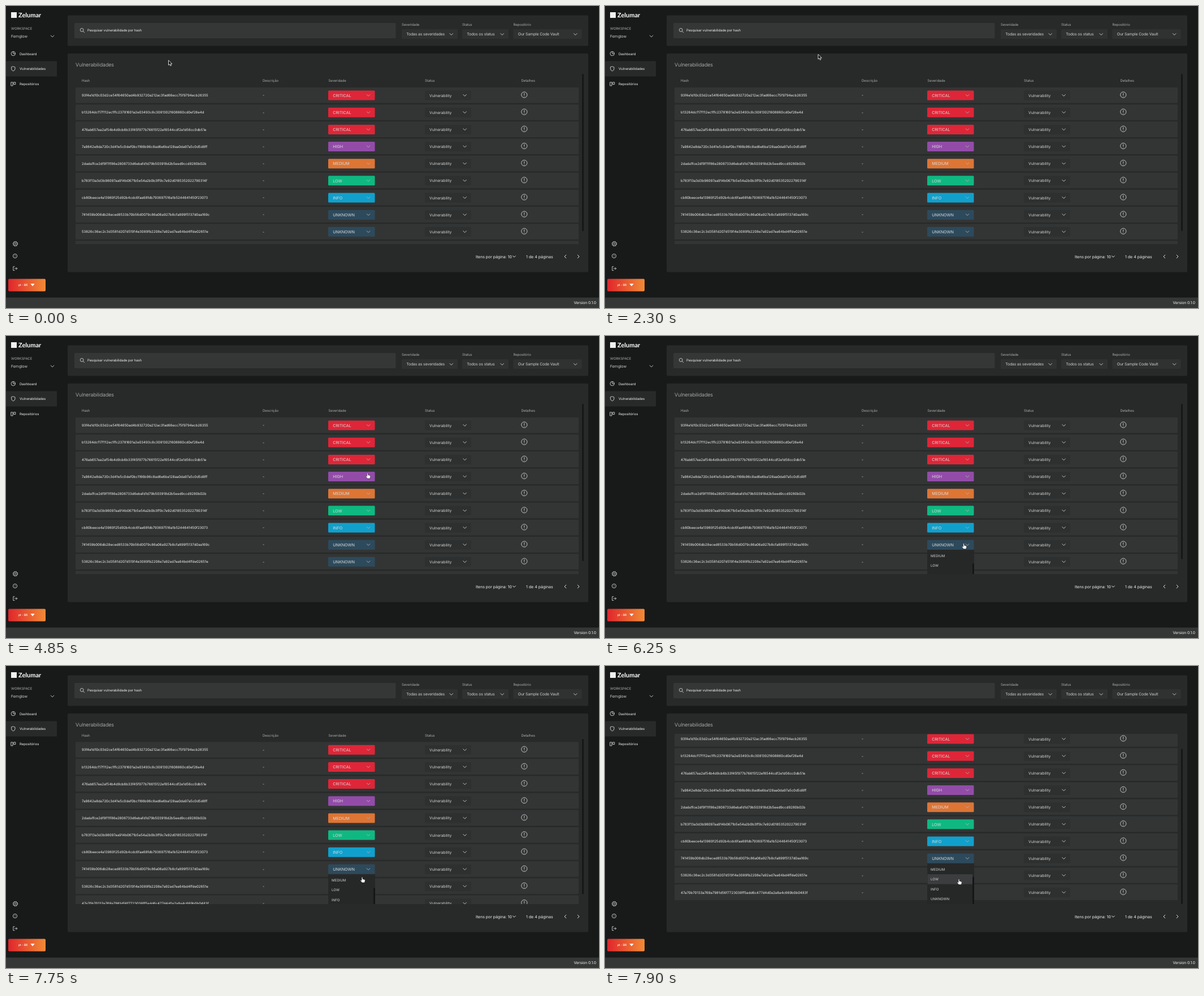
These frames come from a looping animation (1049 by 534 pixels, 8 s). An HTML page:

```html
<!DOCTYPE html>
<html lang="pt-BR">
<head>
<meta charset="utf-8">
<title>Vulnerabilidades</title>
<style>
  html, body { margin: 0; width: 100%; height: 100%; overflow: hidden; background: #181a1a; }
  svg { display: block; width: 100%; height: 100%; }
  text { font-family: Inter, "Noto Sans", sans-serif; text-rendering: geometricPrecision; white-space: pre; }
  .line { fill: none; stroke-linecap: round; stroke-linejoin: round; }
</style>
</head>
<body>
<svg id="stage" viewBox="0 0 1049 534"></svg>
<script>
const LOOP = 8000, TICK = 50;
const WHITE = '#f1f1f1', SOFT = '#d2d2d2', MUTED = '#adadad';
const BG = '#181a1a', PANEL = '#282a2a', ROW = '#333535';
const FIRST_ROW = 158, PITCH = 30.15, OPTION = 17.5;
const VIEW = { top: 120, height: 301 };
const LIST = { x: 570, y: 378, w: 83, h: 72 };

const COLORS = {
  CRITICAL: '#de2638', HIGH: '#924ca8', MEDIUM: '#dd7535',
  LOW: '#10b881', INFO: '#11a0cc', UNKNOWN: '#2d4a5c'
};
const ROWS = [
  ['93f4e1d10c03d2ce54f64650ad4b932720a212ac3fad66ecc75f9794ecb26355', 'CRITICAL'],
  ['b13264dcf17f112ec1ffc23781601a2e03493c8c30813021608860cd0ef26e4d', 'CRITICAL'],
  ['476ab657ea2af54b4d9cb6b33f45f977b76615f22ef6544cdf2e1d56cc0db51e', 'CRITICAL'],
  ['7a9842e8da720c3d41e5c0def0bc1166b96c8ad6e6ba128aa0da97a5c0d5d8ff', 'HIGH'],
  ['2dada1fce2df9f11f86e2808733d6ebafd1d79b503918d2b5eed9ccd9280b02b', 'MEDIUM'],
  ['b783f13a3d3b98097aa914b0671b5e54a2b0b3ff9c7e92d0185352022790314f', 'LOW'],
  ['cb80beece4a13969125d92b4cdc6faa68fdb793697516a1b5244641450f23073', 'INFO'],
  ['741459b006db28eced8533b70b56d0079c86a06a927b8cfa899f5137d0aa169c', 'UNKNOWN'],
  ['53826c36ec2c3d3581d207d51914e3089fb2208e7a92ad7ea64bd4ffde02651e', 'UNKNOWN'],
  ['47a70b70133a769a7981d56f7723038ff5add6c477d4d0a2a8a4c669b0b0483f', 'UNKNOWN']
];

// Pointer moves: first step, last step, destination x, y
const START = [287.5, 96];
const MOVES = [
  [500, 500, 291, 92], [600, 600, 288, 91.5], [900, 1400, 317.5, 97],
  [1600, 1700, 346.5, 88.5], [1900, 1900, 350, 88.5], [2100, 2300, 377, 85.5],
  [2450, 2500, 454, 99], [2650, 2700, 560, 120], [2850, 2900, 719, 133],
  [3050, 3100, 709, 184], [3350, 3450, 686, 227], [3600, 3600, 661, 245],
  [3750, 3800, 646, 247], [3950, 3950, 644, 247], [4100, 4150, 640, 247],
  [4850, 4850, 639.5, 242], [5050, 5250, 639, 291], [5400, 5650, 635, 365],
  [5800, 5800, 634.5, 366.5], [6700, 6900, 634, 372], [7100, 7100, 633.5, 372],
  [7300, 7300, 630, 373], [7850, 7900, 626, 376.5]
];

const rowY = i => FIRST_ROW + i * PITCH;

// Drawing helpers; text is placed by the vertical centre of its capitals
const rect = (x, y, w, h, fill, r = 1.5, extra = '') =>
  `<rect x="${x}" y="${y}" width="${w}" height="${h}" rx="${r}" fill="${fill}" ${extra}/>`;
const text = (str, x, midY, size = 6, fill = WHITE, spacing = -.07, extra = '') =>
  `<text x="${x}" y="${midY + size * .364}" font-size="${size}" fill="${fill}" letter-spacing="${spacing}" ${extra}>${str}</text>`;
const line = (d, color = SOFT, width = .9) =>
  `<path class="line" d="${d}" stroke="${color}" stroke-width="${width}"/>`;
const ring = (x, y, r, color = SOFT, width = .9, extra = '') =>
  `<circle cx="${x}" cy="${y}" r="${r}" fill="none" stroke="${color}" stroke-width="${width}" ${extra}/>`;
const chevron = (x, y, color = SOFT, w = 2.8) =>
  line(`M${x - w} ${y - w / 2}l${w} ${w}l${w} ${-w}`, color);

function sidebar() {
  return rect(9, 11, 10, 10, WHITE, 0) +
    text('Zelumar', 22, 16, 11, '#fff', 0, 'style="font-family:Lato,sans-serif" font-weight="700"') +
    text('WORKSPACE', 9, 39.5, 6, MUTED, -.03) +
    text('Fernglow', 9, 54, 6.8, SOFT, -.1) + chevron(82, 53.5) +
    rect(0, 97.5, 90, 27, PANEL, 0) +
    ring(12.8, 84.2, 3.7) + line('M12.8 80.5V84.2H16.5') + text('Dashboard', 24, 84.5) +
    line('M12.8 107L16 108.2V111Q16 113.8 12.8 115Q9.6 113.8 9.6 111V108.2Z') + text('Vulnerabilidades', 24, 111.2) +
    line('M9.2 134.8H12V141H9.2ZM14 134.8H16.8V138.6H14Z') + text('Repositórios', 24, 137.8) +
    ring(16.5, 420.5, 3.5) + ring(16.5, 420.5, 4.3, SOFT, .8, 'stroke-dasharray="1.7 1.68"') + ring(16.5, 420.5, 1.3, SOFT, .8) +
    ring(16, 442, 3.6) + text('?', 16, 442, 4.8, SOFT, 0, 'text-anchor="middle"') +
    line('M15 460.8H12.8V467.6H15M15.5 464.2H19.6M18 462.4L19.8 464.2L18 466') +
    rect(4, 482.5, 66, 22, 'url(#warm)', 2) +
    text('pt - BR', 22, 493.5, 5, '#fff', 0, 'font-weight="500"') +
    '<path d="M43.3 491h7.4l-3.7 4.6z" fill="#fff"/>';
}

function filters() {
  const select = (label, value, x, w) =>
    text(label, x, 32.5, 6, MUTED) + rect(x, 41, w, 17, '#303232') +
    text(value, x + 8.3, 50, 6.8, SOFT, -.1) + chevron(x + w - 11.3, 50);
  return rect(109, 16.5, 921, 54, PANEL, 2) + rect(121, 30, 568.5, 27, '#353737') +
    ring(134.2, 42.4, 2.9) + line('M136.4 44.6L138.7 46.9') +
    text('Pesquisar vulnerabilidade por hash', 144, 43.2, 6, WHITE, -.1) +
    select('Severidade', 'Todas as severidades', 700, 99) +
    select('Status', 'Todos os status', 807, 82) +
    select('Repositório', 'Our Sample Code Vault', 897.5, 121);
}

function tableRow([hash, severity], i) {
  const y = rowY(i);
  return rect(123, y - 14, 890, 27.6, ROW) +
    text(hash, 134, y, 6.05, WHITE, 0) + text('-', 454, y, 6.5) +
    rect(570, y - 8.4, 82.5, 17, COLORS[severity]) +
    text(severity, 578.2, y + .2, 7.15, '#d9d9d9', 0) + chevron(641, y, '#b0b0b0') +
    rect(741, y - 8.4, 82, 17, '#2e3030') +
    text('Vulnerability', 749, y + .2, 6.8, SOFT, -.06) + chevron(811.6, y) +
    ring(916.8, y - 1, 5.1) + line(`M916.8 ${y - 3.8}v3.4m0 2v.1`);
}

function dropdown() {
  const options = ['MEDIUM', 'LOW', 'INFO', 'UNKNOWN'];
  const top = LIST.y + 1.7;
  return rect(LIST.x, LIST.y, LIST.w, LIST.h, '#262828', 0) +
    rect(LIST.x + .5, top + OPTION, 79.5, OPTION, '#3b3d3f', 0, 'id="hover"') +
    options.map((o, i) => text(o, 576, top + OPTION * (i + .5), 6.1, SOFT, 0)).join('') +
    rect(650, LIST.y + 24, 3, 48, '#151717', 1.2);
}

function table() {
  const heads = [['Hash', 134], ['Descrição', 454], ['Severidade', 570.3], ['Status', 741], ['Detalhes', 911.5]];
  return rect(109, 84, 921, 386.5, PANEL, 2) +
    text('Vulnerabilidades', 123, 103.8, 9, '#c4c4c4', -.1, 'font-weight="300"') +
    `<g clip-path="url(#view)"><g id="content">` +
    heads.map(([name, x]) => text(name, x, 132.2, 6, MUTED)).join('') +
    ROWS.map(tableRow).join('') +
    `<g id="popup" clip-path="url(#list)"><g id="slide">${dropdown()}</g></g></g></g>` +
    rect(1019, VIEW.top, 3, 278, '#161818', 1.5, 'id="thumb"') +
    text('Itens por página: 10', 831, 443.2, 7, WHITE, -.05) + chevron(899, 443, WHITE, 2.4) +
    text('1 de 4 páginas', 920, 443.7, 7, WHITE, 0) +
    line('M990.8 440.2l-2.8 2.8l2.8 2.8M1011.2 440.2l2.8 2.8l-2.8 2.8', WHITE);
}

const $ = id => document.getElementById(id);
const clip = (id, x, y, w, h) => `<clipPath id="${id}">${rect(x, y, w, h, '#000', 0)}</clipPath>`;

$('stage').innerHTML =
  `<defs>${clip('view', 109, VIEW.top, 921, VIEW.height)}${clip('list', LIST.x, LIST.y, LIST.w, LIST.h)}
   <linearGradient id="warm"><stop stop-color="#e0262c"/><stop offset="1" stop-color="#f18a36"/></linearGradient></defs>` +
  rect(0, 0, 1049, 534, BG, 0) + sidebar() + filters() + table() +
  rect(0, 515.5, 1049, 18.5, '#353737', 0) + text('Version 0.1.0', 1044, 525, 6.8, WHITE, -.08, 'text-anchor="end"') +
  `<path id="arrow" d="M0 0V8.6L2 6.8L3.4 9.9L4.9 9.2L3.6 6.3H6.4Z" fill="#111" stroke="#fff" stroke-width=".8"/>
   <path id="hand" d="M-.9 1Q0-.4 .9 1V3.8L4 4.5Q5.4 4.9 5.2 6.4L4.3 10H-.2L-3 6.6Q-3.2 5.3-2 5.6L-.9 6.4Z"
     fill="#fff" stroke="#111" stroke-width=".5"/>`;

function pointerAt(t) {
  let [x, y] = START;
  for (const [first, last, toX, toY] of MOVES) {
    if (t < first) break;
    const k = Math.min(1, (t - first + TICK) / (last - first + TICK));
    x += (toX - x) * k;
    y += (toY - y) * k;
  }
  return [x, y];
}

function scrollAt(t) {
  if (t < 7650) return 0;
  const u = Math.min(1, Math.max(0, (t - 7700) / 200));
  return Math.max(1, 29 * (1 - (1 - u) ** 1.43));
}

const show = (id, on) => $(id).setAttribute('visibility', on ? 'visible' : 'hidden');
const move = (id, x, y) => $(id).setAttribute('transform', `translate(${x} ${y})`);

function draw(t) {
  const scroll = scrollAt(t), [x, y] = pointerAt(t);
  move('content', 0, -scroll);

  const open = Math.min(1, Math.max(0, (t - 5800) / 250));
  show('popup', open > 0);
  move('slide', 0, -LIST.h * (1 - open) ** 2);
  show('hover', t >= 7850);

  const ratio = VIEW.height / (open ? 330 : 326);
  $('thumb').setAttribute('y', VIEW.top + scroll * ratio);
  $('thumb').setAttribute('height', VIEW.height * ratio);

  const tableY = y + scroll;
  const overBadge = ROWS.some((_, i) => Math.abs(tableY - rowY(i)) < 8.6);
  const hand = x > 570 && x < 652.5 && (overBadge || (open > 0 && tableY > LIST.y - 1));
  show('hand', hand);
  show('arrow', !hand);
  move(hand ? 'hand' : 'arrow', x, y);
}

function frame() {
  const t = performance.now() % LOOP;
  draw(Math.floor(t / TICK) * TICK);
  requestAnimationFrame(frame);
}
frame();
</script>
</body>
</html>
```
